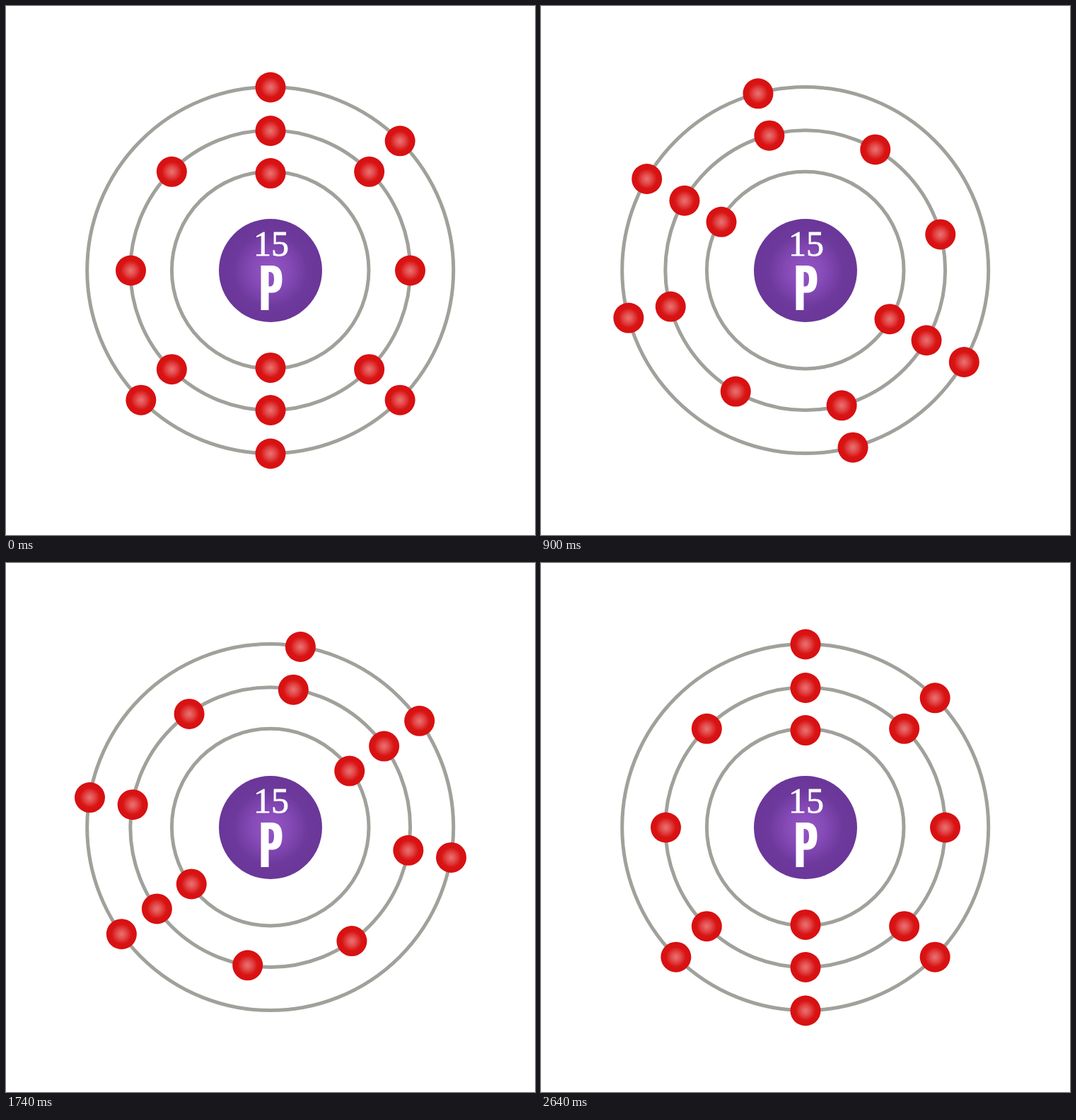
Recreate the animation shown at these times as an HTML page with a canvas. Size 748 px wide and 748 px high, loop 2670 ms.

```html
<!DOCTYPE html>
<html lang="en">
<head>
<meta charset="utf-8">
<title>Atom shells</title>
<style>
  html, body { margin: 0; width: 100%; height: 100%; overflow: hidden; background: #fff; }
  canvas { display: block; }
</style>
</head>
<body>
<canvas id="stage" width="748" height="748" role="img" aria-label="15 P"></canvas>
<script>
const ctx = document.getElementById("stage").getContext("2d");
const CENTER = 374;
const STEP = 30, LOOP = 2670;
const HALF_STEP = 45, LAST_STEP = 88;

// Angles are in degrees, clockwise from the top.
const shells = [
  { ring: 139.3, orbit: 137.4, electrons: [0, 180] },
  { ring: 197.9, orbit: 197.5, electrons: [0, 45, 90, 135, 180, 225, 270, 315] },
  { ring: 259, orbit: 259, electrons: [0, 45, 135, 180, 225] }
];

// Condensed capital with an open counter.
const letterP = new Path2D(
  "M360.5 367H375C386 367 390.5 373 390.5 386C390.5 399 386 405.5 376 405.5H371.5V430H360.5Z" +
  "M371.5 376V396.5C377 397 379 394 379 386C379 378.5 377 376 371.5 376Z"
);

function radial(radius, stops) {
  const fill = ctx.createRadialGradient(0, 0, 0, 0, 0, radius);
  stops.forEach(([at, color]) => fill.addColorStop(at, color));
  return fill;
}

const redFill = radial(21.5, [[0, "#e97373"], [0.3, "#e34c4c"], [0.65, "#d91414"], [1, "#d70f10"]]);
const purpleFill = radial(73, [[0, "#9457c6"], [0.35, "#874bb8"], [0.72, "#6d399c"], [1, "#6a3799"]]);

function circle(x, y, radius) {
  ctx.beginPath();
  ctx.arc(x, y, radius, 0, Math.PI * 2);
}

function ball(x, y, radius, fill) {
  ctx.save();
  ctx.translate(x, y);
  circle(0, 0, radius);
  ctx.fillStyle = fill;
  ctx.fill();
  ctx.restore();
}

function drawNucleus() {
  ball(CENTER, CENTER, 73, purpleFill);
  ctx.fillStyle = ctx.strokeStyle = "#fff";
  ctx.font = "50px 'Liberation Serif', serif";
  ctx.textAlign = "center";
  ctx.lineWidth = 0.8;
  ctx.fillText("15", 375, 353);
  ctx.strokeText("15", 375, 353);
  ctx.fill(letterP, "evenodd");
}

// The second half turn is slightly faster than the first.
function rotation(step) {
  return step <= HALF_STEP
    ? 180 * step / HALF_STEP
    : 180 + 180 * (step - HALF_STEP) / (LAST_STEP - HALF_STEP);
}

function draw(now) {
  const turn = rotation(Math.floor((now % LOOP) / STEP));
  ctx.fillStyle = "#fff";
  ctx.fillRect(0, 0, 748, 748);

  for (const { ring } of shells) {
    circle(CENTER - 0.3, CENTER - 0.4, ring);
    ctx.strokeStyle = "#a1a19b";
    ctx.lineWidth = 5;
    ctx.stroke();
  }
  drawNucleus();
  for (const { orbit, electrons } of shells) {
    for (const offset of electrons) {
      const angle = (turn + offset) * Math.PI / 180;
      ball(CENTER + orbit * Math.sin(angle), CENTER - orbit * Math.cos(angle), 21.5, redFill);
    }
  }
  requestAnimationFrame(draw);
}

draw(performance.now());
</script>
</body>
</html>
```
